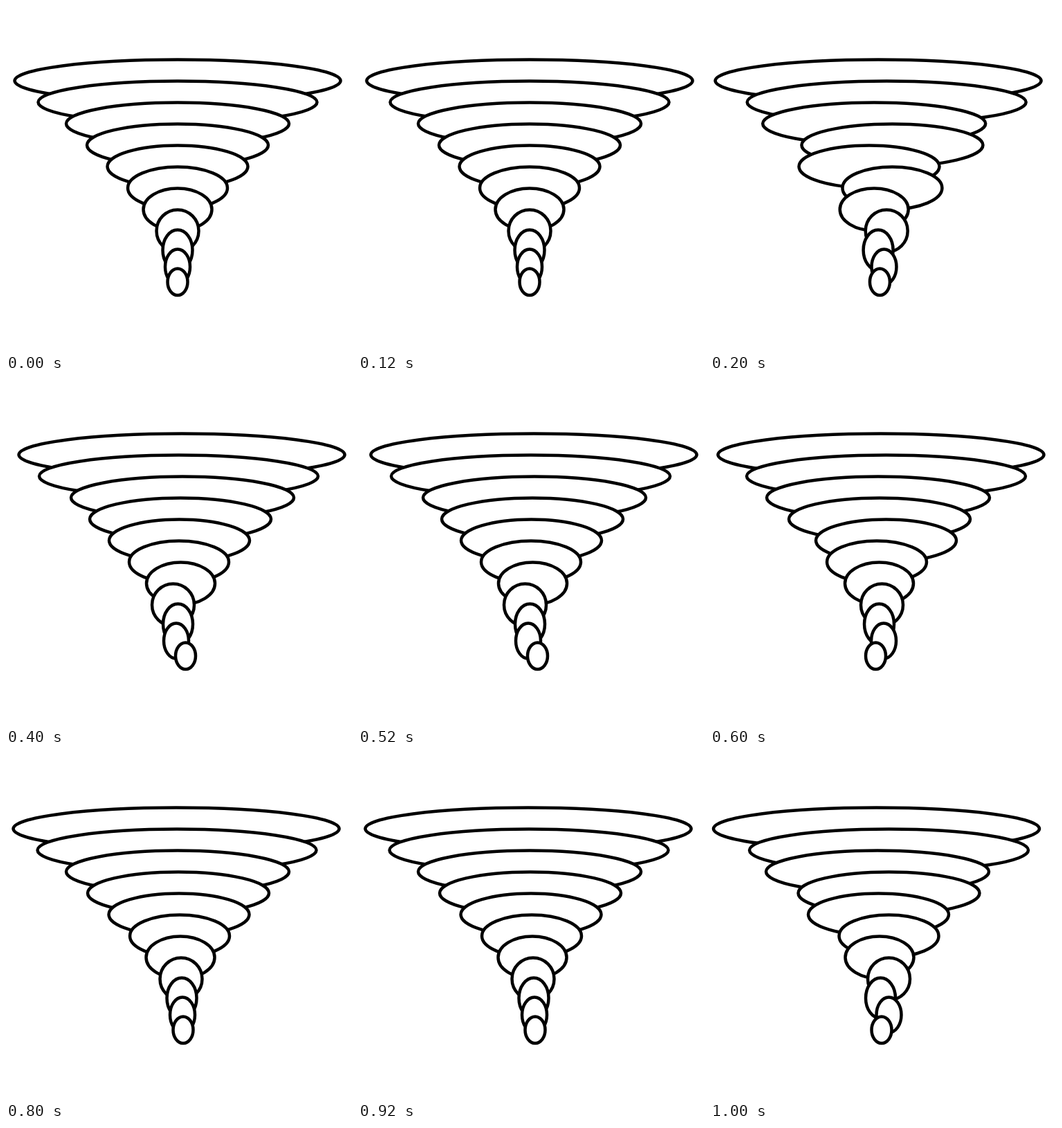
An HTML page that plays this animation: 500x500 px, repeating every 1200 ms.

```html
<!DOCTYPE html>
<html lang="en">
<head>
<meta charset="utf-8">
<title>Tornado</title>
<style>
html, body { margin: 0; width: 100%; height: 100%; overflow: hidden; background: #fff; }
svg { display: block; width: 100%; height: 100%; }
ellipse { fill: #fff; stroke: #000; stroke-width: 4.5; }
</style>
</head>
<body>
<svg id="stage" viewBox="0 0 500 500"></svg>
<script>
const STEP = 200, CENTER = 248;
const widths = [235.5, 201.5, 161, 131, 101.5, 72, 49.5, 30.5, 21.5, 18, 14.5];
const lean = [6, 1.5, 7, 4, 2.5, 2, 4.5, -6.5, 0.5, -2, 11.5];
const wobble = [-1, 6.5, -5, -3, 6.5, -7, -3.5, 0.5, -3.5, 3, -8.5];

// Each pose gives the sideways shift of ring i, counted from the top.
const poses = [
  () => 0,
  i => (i % 2 ? 18 : -18) / (1 + (i - 4) ** 2 / 6), // zigzag, widest in the middle
  i => lean[i],
  i => wobble[i],
  i => i - 2,                                       // straight tilt
  i => i % 2 ? 10.5 : 0.75 * i - 7.5                // zigzag, drifting right
];

const stage = document.getElementById("stage");
const rings = widths.map((rx, i) => {
  const ring = document.createElementNS(stage.namespaceURI, "ellipse");
  const top = 77.5 + Math.min(31 * i, 28 * i + 22);
  const ry = 30.5 - 1.25 * Math.max(0, i - 7) ** 2;
  ring.setAttribute("rx", rx);
  ring.setAttribute("ry", ry);
  ring.setAttribute("cy", top + ry);
  return stage.appendChild(ring);
});

function draw(time) {
  const shift = poses[Math.floor(time / STEP) % poses.length];
  rings.forEach((ring, i) => ring.setAttribute("cx", CENTER + shift(i)));
}

const start = performance.now();
function tick() {
  draw(performance.now() - start);
  requestAnimationFrame(tick);
}
tick();
</script>
</body>
</html>
```
